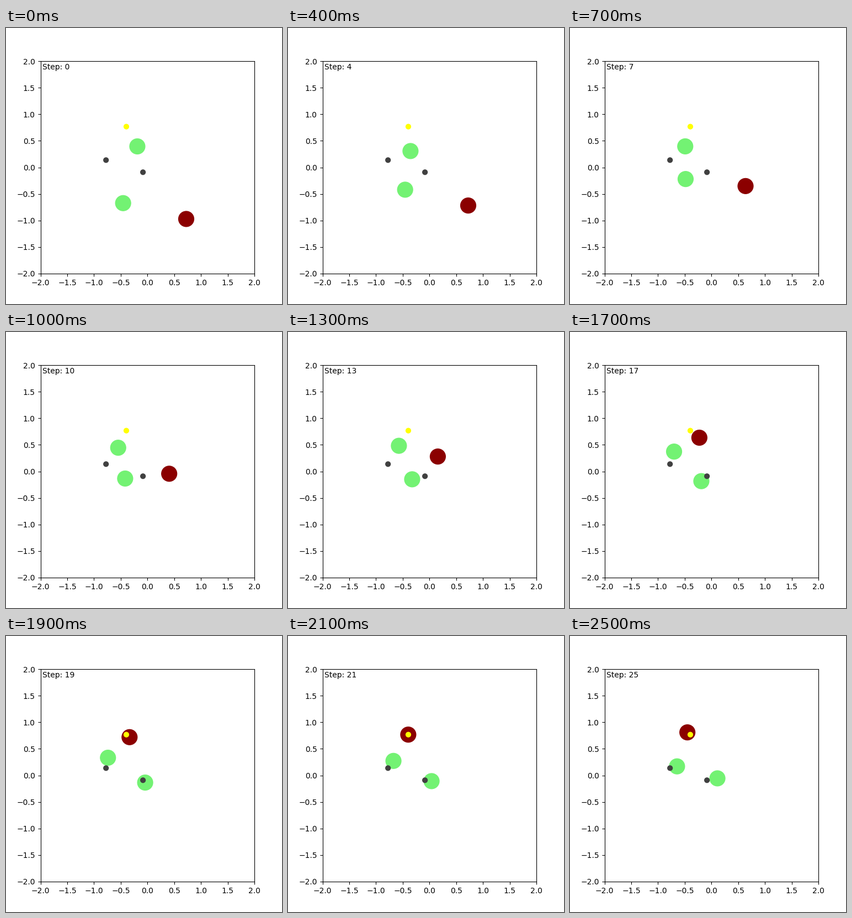
Recreate the animation shown at these times as a matplotlib script. Size 500 by 500 pixels, loop 2600 ms.

```python
import matplotlib.pyplot as plt
import numpy as np
from matplotlib.animation import FuncAnimation

FRAMES = 26
INTERVAL = 100
DAMPING = 0.25
THRUST = 0.05  # distance covered in one step after a single push

PUSH = {"L": (-1, 0), "R": (1, 0), "U": (0, 1), "D": (0, -1), ".": (0, 0)}

# colour, start, one push per step
AGENTS = [
    ("darkred", (0.725, -0.971), "UUUULULULULULUL........."),
    ((0.45, 0.95, 0.45), (-0.189, 0.395), "LDLUUD..U..D.L.DUDR..LRD"),
    ((0.45, 0.95, 0.45), (-0.455, -0.673), "UUULR...R..D..RUR....UD."),
]
LANDMARKS = [
    ("yellow", (-0.395, 0.767)),
    ((0.25, 0.25, 0.25), (-0.775, 0.137)),
    ((0.25, 0.25, 0.25), (-0.084, -0.091)),
]


def trajectory(start, pushes):
    """Damped point mass: position advances before the velocity is updated."""
    position, velocity = np.array(start, float), np.zeros(2)
    path = [position]
    for push in pushes + ".":
        position = position + velocity * THRUST
        velocity = velocity * (1 - DAMPING) + PUSH[push]
        path.append(position)
    return path


paths = np.array([trajectory(start, pushes) for _, start, pushes in AGENTS])

fig, ax = plt.subplots(figsize=(5, 5), dpi=100)
ax.set(xlim=(-2, 2), ylim=(-2, 2))
ax.set_xticks(np.arange(-2, 2.1, 0.5))
ax.set_yticks(np.arange(-2, 2.1, 0.5))

agents = ax.scatter(*paths[:, 0].T, s=400, c=[a[0] for a in AGENTS])
spots = np.array([spot for _, spot in LANDMARKS])
ax.scatter(*spots.T, s=40, c=[mark[0] for mark in LANDMARKS])
label = ax.text(0.01, 0.99, "", transform=ax.transAxes, va="top")


def update(step):
    agents.set_offsets(paths[:, step])
    label.set_text(f"Step: {step}")
    return agents, label


anim = FuncAnimation(fig, update, frames=FRAMES, interval=INTERVAL, repeat=True)
plt.show()
```
